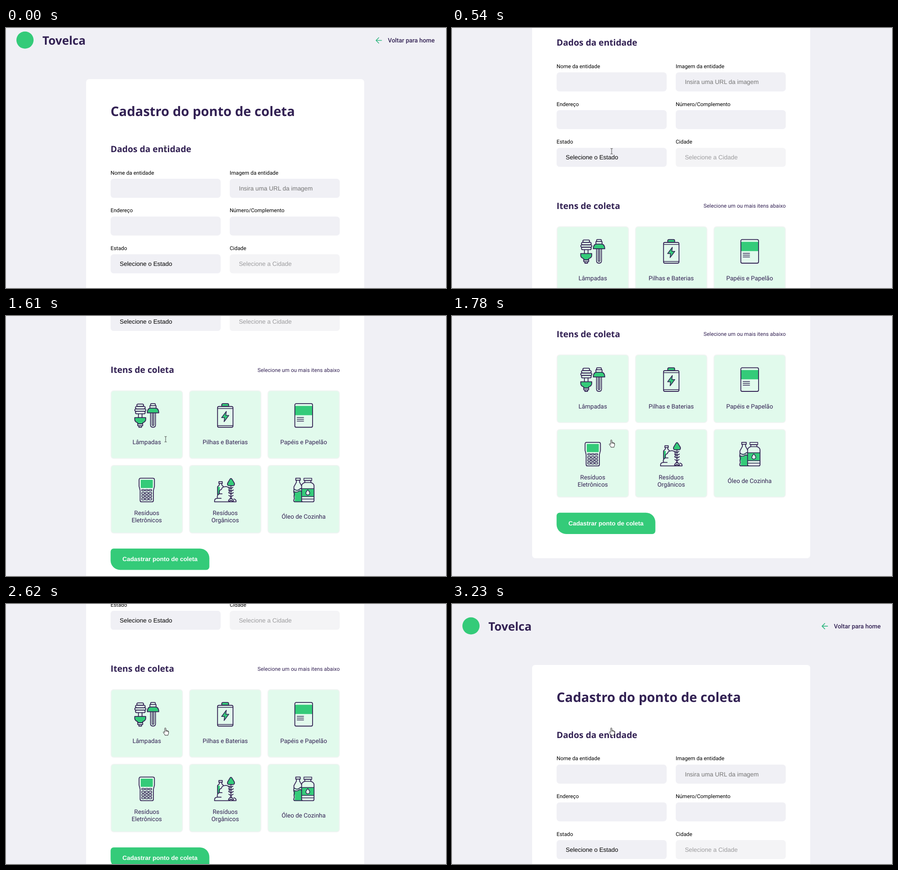
An HTML page that plays this animation: 973 by 576 pixels, repeating every 4.38 s.

```html
<!DOCTYPE html>
<html lang="pt-BR">
<head>
<meta charset="utf-8">
<title>Cadastro do ponto de coleta</title>
<style>
  html, body { margin: 0; width: 100%; height: 100%; overflow: hidden; background: #f0f0f5; }
  svg { display: block; }
  text { font: 13.48px Roboto, sans-serif; fill: #322153; text-rendering: geometricPrecision; }
  .head { font-family: "Open Sans", "Noto Sans", sans-serif; font-weight: 700; }
  .brand { font-size: 25.9px; }
  .h1 { font-size: 29.1px; }
  .h2 { font-size: 19.2px; }
  .back { font-weight: 500; }
  .note { font-size: 11.8px; text-anchor: end; }
  .label { font-size: 11.8px; fill: #000; }
  .input { font-family: "Liberation Sans", Arial, sans-serif; fill: #757575; }
  .select { fill: #000; }
  .off { fill: #9c9c9e; }
  .item { text-anchor: middle; }
  .button { font-family: "Liberation Sans", Arial, sans-serif; font-weight: 700; fill: #fff; text-anchor: middle; }
  .icon { fill: none; stroke: #322153; stroke-width: 1.8; stroke-linejoin: round; stroke-linecap: round; }
  .g { fill: #34cb79; }
  .bg { fill: #e1faec; }
  .flat { stroke: none; }
  .thin { stroke-width: 1.5; }
</style>
</head>
<body>
<svg width="973" height="576" viewBox="0 0 973 576">
  <defs>
    <g id="lamps" class="icon">
      <rect x="-22" y="2" width="15" height="5.2" rx="2.6"/>
      <rect x="-25" y="7.2" width="21.5" height="5.4" rx="2.7"/>
      <rect x="-26.5" y="12.6" width="24.5" height="5.4" rx="2.7"/>
      <rect x="-25" y="18" width="21.5" height="5.4" rx="2.7"/>
      <path d="M-18.5 23.5V32M-10.5 23.5V32"/>
      <path class="g" d="M-26.7 32H-2.3V36Q-2.3 41-9 43.5V46H-20V43.5Q-26.7 41-26.7 36Z"/>
      <path d="M-20 46H-9V50H-20ZM-17.5 50V53.3H-11.5V50"/>
      <path d="M8.5 5.5V2.5Q8.5 1 10 1H17.5Q19 1 19 2.5V5.5ZM7 11V5.5H20.5V11"/>
      <path class="g" d="M1.2 21.5Q1.2 11 9 11H18.5Q26.5 11 26.5 21.5Z"/>
      <path d="M8.3 21.5V48Q8.3 53.3 13.8 53.3Q19.3 53.3 19.3 48V21.5M12.2 21.5V48Q12.2 49.5 13.8 49.5Q15.4 49.5 15.4 48V21.5"/>
    </g>
    <g id="battery" class="icon">
      <path class="g" d="M-7.7 7V3.5Q-7.7 1-5 1H5Q7.7 1 7.7 3.5V7Z"/>
      <rect x="-17" y="7.3" width="34.2" height="46" rx="3"/>
      <path class="thin" d="M-17 11.8H17M-17 49.5H17"/>
      <path class="g thin" d="M2.5 18L-8 32H-1.5L-2.5 41L8 27H1.5Z"/>
    </g>
    <g id="paper" class="icon">
      <path class="g flat" d="M-19.5 6H19.5V26.5H-19.5Z"/>
      <rect x="-19.5" y="1" width="39.2" height="52.3" rx="3"/>
      <path class="thin" d="M-14.5 31.5H0M-14.5 35.5H0M-14.5 39.5H0"/>
    </g>
    <g id="terminal" class="icon">
      <path d="M-13.5 1H13.5Q17 1 17 4.5V19L14.7 28V50Q14.7 53.3 11.5 53.3H-11.5Q-14.7 53.3-14.7 50V28L-17 19V4.5Q-17 1-13.5 1Z"/>
      <rect class="g flat" x="-13.3" y="4.5" width="26.6" height="18" rx="1"/>
      <g id="keys" class="thin"></g>
    </g>
    <g id="organic" class="icon">
      <path class="g flat" d="M-17 20H-12V34L-17 38Z"/>
      <path d="M-14 8.5H-6.5V12.5H-14ZM-13 12.5V16L-17 20V37M-7.5 12.5V16L-4 19.5"/>
      <path d="M-23.5 53Q-24 47-20 46L-17 45.5Q-19 38-13 35.5Q-14 27-8.5 26Q-7 20.5-2 20Q5 18 9 24V32M-17 45.5H-9M-13 35.5H-7"/>
      <path class="g" d="M10.6 3Q12.7 0 14.8 3L20.3 12Q21.5 17.5 17 17.5H8.5Q4 17.5 5.2 12Z"/>
      <path d="M12.7 17.5V47M8.5 21L12.7 24L17 21M7.5 27L12.7 30L18 27M7.5 33L12.7 36L18 33M8 39L12.7 42L17.5 39"/>
      <path d="M12.7 44L7.5 50V53L12.7 50L18 53V50ZM-23.5 53.2H24V51Q23 47.5 19 47"/>
    </g>
    <g id="bottles" class="icon">
      <path class="g flat" d="M-21 24Q-15 29-10 25T-4 25V53H-20L-19 43L-22 38Z"/>
      <path class="bg flat" d="M-21 26Q-15 31-10 27T-4 28V31Q-8 27-12 31T-21 30Z"/>
      <path d="M-17.5 1H-7.5V5.5H-17.5ZM-16 5.5V10L-21.5 20V27Q-23 32-20 36Q-22.5 41-20.5 45L-22 50Q-22 53.3-19 53.3H-4M-9 5.5V10L-5 17M-21 25Q-15 30-10 26T-4.5 25M-21 31Q-15 33-11 30T-4.5 31"/>
      <path class="bg" d="M2.5 6H16V10.5Q23 13 23 18V50Q23 53.3 20 53.3H-1.5Q-4.5 53.3-4.5 50V18Q-4.5 13 2.5 10.5Z"/>
      <path class="g thin" d="M-4.5 24H23V41.5H-4.5Z"/>
      <path class="bg thin" d="M9.2 26.5Q14 32 13.5 34.5Q12.8 38 9.2 38Q5.5 38 5 34.5Q4.5 32 9.2 26.5Z"/>
      <path class="thin" d="M.5 1H18V6H.5ZM2.5 10.5H16M-4.5 47H23"/>
    </g>
  </defs>

  <rect width="973" height="576" fill="#f0f0f5"/>
  <g id="page">
    <circle cx="42" cy="48.5" r="19" fill="#34cb79"/>
    <text class="head brand" x="80.5" y="58.5">Tovelca</text>
    <path d="M830.5 49.2H818.5M824.3 43.2L818.3 49.2L824.3 55.2" fill="none" stroke="#34b883" stroke-width="1.7" stroke-linecap="round" stroke-linejoin="round"/>
    <text class="back" x="844.5" y="53.8">Voltar para home</text>

    <rect x="177.2" y="134.9" width="614.9" height="1013.1" rx="6.7" fill="#fff"/>
    <text class="head h1" x="231.3" y="217">Cadastro do ponto de coleta</text>
    <text class="head h2" x="231.3" y="296.5">Dados da entidade</text>
    <g id="fields"></g>
    <text class="head h2" x="231.3" y="658.3">Itens de coleta</text>
    <text class="note" x="738" y="655.7">Selecione um ou mais itens abaixo</text>
    <g id="items"></g>
    <path fill="#34cb79" d="M238 1047.2H428.7A21 21 0 0 1 449.7 1068.2V1087.7A6.7 6.7 0 0 1 443 1094.4H252.3A21 21 0 0 1 231.3 1073.4V1053.9A6.7 6.7 0 0 1 238 1047.2Z"/>
    <text class="button" x="340.5" y="1075.4">Cadastrar ponto de coleta</text>
  </g>

  <path id="beam" fill="none" stroke="#444"
    d="M-2.5-6H-.8Q0-6 0-5Q0-6 .8-6H2.5M0-5V5M-2.5 6H-.8Q0 6 0 5Q0 6 .8 6H2.5"/>
  <path id="hand" transform="translate(352.3 274.5)" fill="#fff" stroke="#222" stroke-linejoin="round"
    d="M-1.3 1.3Q-1.3 0 0 0Q1.3 0 1.3 1.3V5.5Q2.7 4.8 3.6 6Q5 5.5 5.7 6.8Q7.3 6.6 7.3 8.5V11Q7.2 13.5 6 15V16.3H-1V15Q-3 12.5-4.6 10Q-4.5 8-2.8 8.8L-1.3 10.3ZM1.3 5.5V8M3.6 6V8.5M5.7 6.8V9"/>
</svg>
<script>
const $ = id => document.getElementById(id);
const text = (cls, x, y, s) => `<text class="${cls}" x="${x}" y="${y}">${s}</text>`;
const rect = (x, y, w, h, r, rest = '') =>
  `<rect x="${x}" y="${y}" width="${w}" height="${h}" rx="${r}" ${rest}/>`;

const fields = [
  ['Nome da entidade'],
  ['Imagem da entidade', 'Insira uma URL da imagem', ''],
  ['Endereço'],
  ['Número/Complemento'],
  ['Estado', 'Selecione o Estado', 'select'],
  ['Cidade', 'Selecione a Cidade', 'off']
];
$('fields').innerHTML = fields.map(([label, value, state], i) => {
  const x = 231.3 + i % 2 * 263.4, y = 355.8 + (i >> 1) * 83.6;
  const fill = state === 'off' ? '#f4f4f6' : '#f0f0f5';
  return text('label', x, y - 9.4, label) +
    rect(x, y, 243.4, 42.1, 6.7, `fill="${fill}"`) +
    (value ? text('input ' + state, x + 20.2, y + 25.8, value) : '');
}).join('');

const items = [
  ['lamps', 'Lâmpadas'],
  ['battery', 'Pilhas e Baterias'],
  ['paper', 'Papéis e Papelão'],
  ['terminal', 'Resíduos', 'Eletrônicos'],
  ['organic', 'Resíduos', 'Orgânicos'],
  ['bottles', 'Óleo de Cozinha']
];
$('items').innerHTML = items.map(([icon, ...lines], i) => {
  const x = 231.3 + i % 3 * 173.45, y = 696.8 + (i / 3 | 0) * 165.2, mid = x + 80;
  const base = y + 119.3 - (lines.length - 1) * 8.1;
  return rect(x + .9, y + .9, 158.2, 149.9, 6, 'fill="#e1faec" stroke="#f1f4f3" stroke-width="1.7"') +
    `<use href="#${icon}" x="${mid}" y="${y + 28.4}"/>` +
    lines.map((s, k) => text('item', mid, base + k * 16.2, s)).join('');
}).join('');

$('keys').innerHTML = Array.from({ length: 12 }, (_, i) => {
  const row = i / 3 | 0;
  return rect(-11.2 + i % 3 * 8, 26 + row * 6.4, 6.2, row ? 3.9 : 3, 1);
}).join('');

// [start ms, scroll px]
const LOOP = 4380;
const scroll = [
  [0, 21.7],
  [380, 58], [460, 150], [540, 257.5], [610, 368], [690, 468], [760, 527.3],
  [1610, 532], [1680, 578], [1780, 611.5],
  [2460, 600.5], [2540, 560], [2610, 508], [2690, 445], [2760, 385], [2840, 320], [2910, 260],
  [3000, 165], [3080, 85], [3160, 25], [3230, 0]
];
const MOVE_AT = 380, HAND_AT = 1780;

function draw() {
  const t = performance.now() % LOOP;
  const y = scroll.findLast(step => step[0] <= t)[1];
  const hand = t >= HAND_AT;
  $('page').setAttribute('transform', `translate(0 ${-y})`);
  $('beam').setAttribute('transform', t < MOVE_AT ? 'translate(351.5 267)' : 'translate(353 273)');
  $('beam').setAttribute('visibility', hand ? 'hidden' : 'visible');
  $('hand').setAttribute('visibility', hand ? 'visible' : 'hidden');
  requestAnimationFrame(draw);
}
draw();
</script>
</body>
</html>
```
